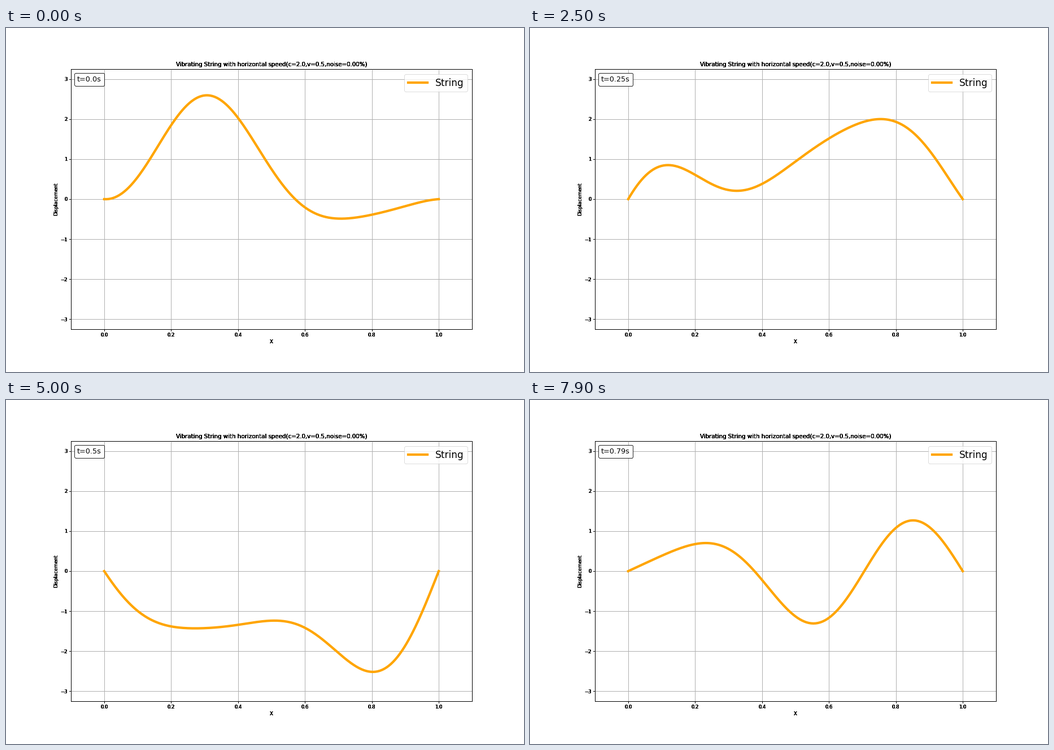
Write a matplotlib script that moves like this. It is 917 px wide and 611 px high and loops after 8000 ms.

```python
import numpy as np
import matplotlib.pyplot as plt
from matplotlib.animation import FuncAnimation
from matplotlib.offsetbox import AnchoredText

W, H = 917, 611
DPI = W / 15
FRAMES, STEP_MS = 80, 100
BOX = [0.125, 0.125, 0.775, 0.755]
LAYERS = 6  # stacked axes give the heavy, overprinted labels
AMPS = (1.25, 2.0, 0.5)
TITLE = "Vibrating String with horizontal speed(c=2.0,v=0.5,noise=0.00%)"

plt.rcParams["font.family"] = "DejaVu Sans"
# the tiny margin keeps the pixel size from rounding down
fig = plt.figure(figsize=((W + 0.001) / DPI, (H + 0.001) / DPI), dpi=DPI,
                 facecolor="white")


def add_layer(k):
    ax = fig.add_axes(BOX, label=f"layer{k}")
    ax.patch.set_visible(k == 0)
    ax.set(xlim=(-0.1, 1.1), ylim=(-3.245, 3.245),
           xlabel="X", ylabel="Displacement", title=TITLE)
    ax.grid(True)
    return ax


def displacement(x, t):
    """Travelling modes of a string that moves between two fixed ends."""
    phase = np.pi * (1.5 * t + 0.5 * x - 0.25)
    return sum(a * np.sin(n * np.pi * x) * np.cos(n * phase)
               for n, a in enumerate(AMPS, 1))


ax = [add_layer(k) for k in range(LAYERS)][-1]
x = np.linspace(0, 1, 301)
string, = ax.plot(x, displacement(x, 0), color="orange", lw=5, label="String")
ax.legend(loc="upper right", fontsize=20)

clock = AnchoredText("t=0.0s", loc="upper left", prop={"size": 15})
clock.patch.set_boxstyle("round,pad=0.,rounding_size=0.2")
ax.add_artist(clock)


def update(i):
    t = i / 100
    string.set_ydata(displacement(x, t))
    clock.txt.set_text(f"t={t}s")
    return string, clock


anim = FuncAnimation(fig, update, frames=FRAMES, interval=STEP_MS,
                     repeat=True, repeat_delay=0)
plt.show()
```
